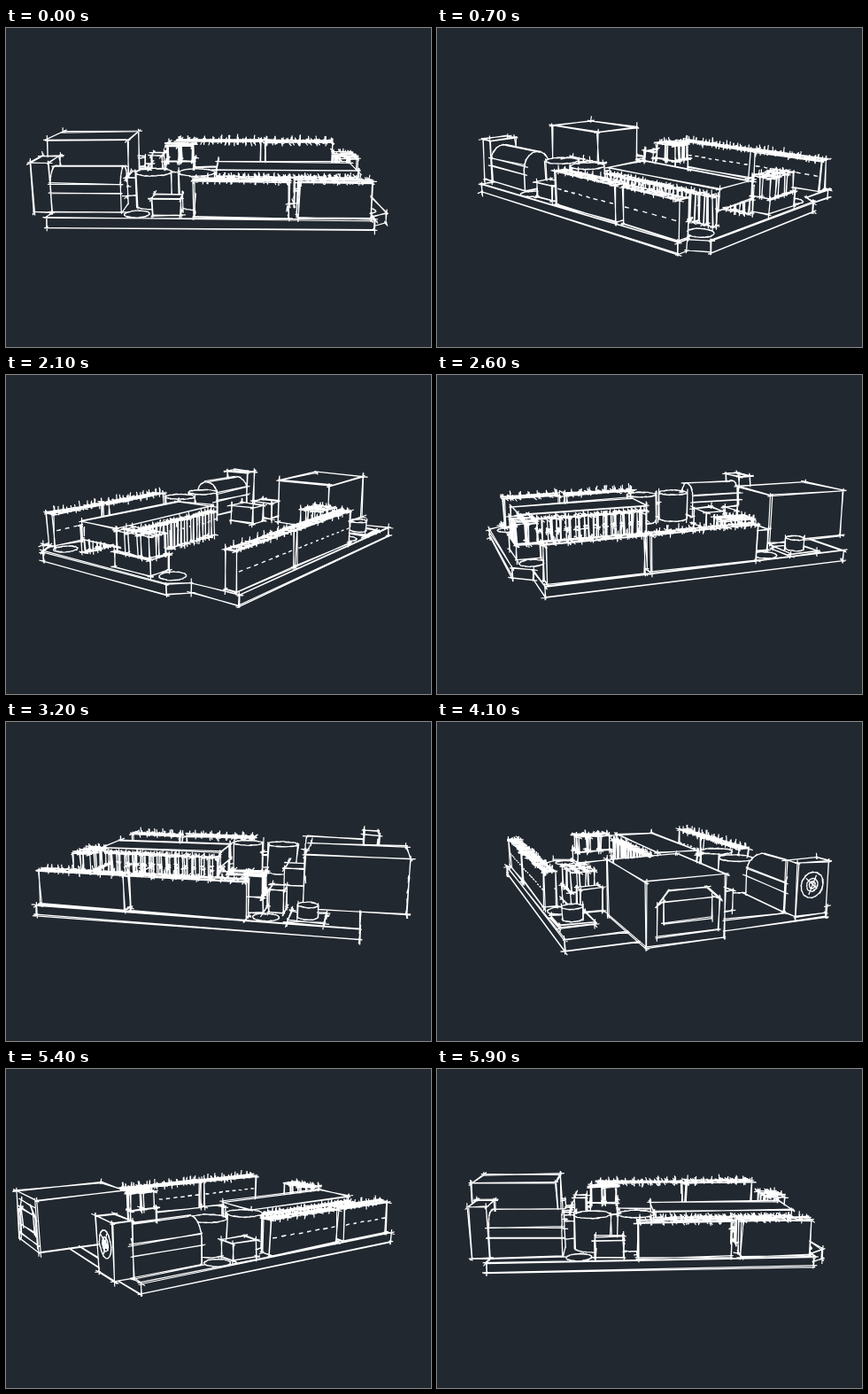
Recreate the animation shown at these times as an HTML page with a canvas. Size 480 by 360 pixels, loop 6000 ms.

```html
<!DOCTYPE html>
<html lang="en">
<head>
<meta charset="utf-8">
<title>Rotating circuit board sketch</title>
<style>
html, body { margin: 0; width: 100%; height: 100%; overflow: hidden; background: #212830; }
canvas { display: block; }
</style>
</head>
<body>
<canvas id="stage" width="480" height="360"></canvas>
<script>
const W = 480, H = 360, STEP = 100, STEPS = 60;
const ctx = document.getElementById('stage').getContext('2d');
const depth = new Float32Array(W * H);
const faces = [], edges = [];

// ---- model, in millimetres around the pivot ----
function line(a, b, soft = false, extra = {}) {
  edges.push({ a, b, soft, ...extra });
}

function loop(ring, soft) {
  ring.forEach((p, i) => line(p, ring[(i + 1) % ring.length], soft));
}

function solid(lo, hi, round = false) {
  const n = lo.length;
  const quads = lo.map((p, i) => [p, lo[(i + 1) % n], hi[(i + 1) % n], hi[i]]);
  faces.push(lo, hi, ...quads);
  loop(lo, round);
  loop(hi, round);
  lo.forEach((p, i) =>
    line(p, hi[i], false, round ? { sides: [quads[(i + n - 1) % n], quads[i]] } : {}));
}

const at = (ring, z) => ring.map(([x, y]) => [x, y, z]);
const rect = (x0, x1, y0, y1) => [[x0, y0], [x1, y0], [x1, y1], [x0, y1]];
const prism = (ring, z0, z1, round) => solid(at(ring, z0), at(ring, z1), round);
const box = (x0, x1, y0, y1, z0, z1) => prism(rect(x0, x1, y0, y1), z0, z1);

function circle(x, y, r, n = 20) {
  return Array.from({ length: n }, (_, i) => {
    const a = i / n * 2 * Math.PI;
    return [x + r * Math.cos(a), y + r * Math.sin(a)];
  });
}

function header(x0, x1, y0, y1, pins) {
  const top = 7.4, pitch = (x1 - x0) / pins, mid = (y0 + y1) / 2;
  box(x0, x1, y0, y1, 0, top);
  for (let i = 0; i < pins; i++) {
    const x = x0 + pitch * (i + .5);
    loop(at(rect(x - .75, x + .75, mid - .75, mid + .75), top));
    for (const y of [mid - .75, mid + .75])
      line([x - .75, y, top], [x - .75, y, top + .5]);
    for (const y of [y0, y1])
      line([x - .5, y, 3.6], [x + .5, y, 3.6], true, { oblique: true });
  }
}

function pinBlock(x0, x1, y0, y1) {
  box(x0, x1, y0, y1, 0, 3.2);
  const px = (x1 - x0) / 2, py = (y1 - y0) / 3;
  for (let i = 0; i < 2; i++)
    for (let j = 0; j < 3; j++) {
      const x = x0 + px * i, y = y0 + py * j;
      box(x + .35, x + px - .35, y + py * .15, y + py * .85, 3.2, 7.4);
    }
}

function buildBoard() {
  prism([[-34, -26], [32, -26], [32, -23.5], [35.5, -21], [35.5, 15.6],
    [32, 18.6], [32, 29.5], [-34, 29.5]], -2.1, 0);
  for (const [x, y] of [[31.2, -18.8], [31.2, 13.4], [-16, -23.3], [-16, 26]])
    loop(at(circle(x, y, 2.6), 0), true);
}

function buildUsb() {
  const x = -42.8, y0 = 3.2, y1 = 17.9, top = 11.2;
  box(x, -22.5, y0, y1, 0, top);
  const onFace = ([u, v]) => [x, y1 + (y0 - y1) * u, top * v];
  loop([[.13, .14], [.13, .62], [.27, .84], [.75, .84], [.92, .64], [.92, .14]].map(onFace));
  loop([[.22, .34], [.22, .68], [.83, .68], [.83, .34]].map(onFace));
  line(onFace([.13, .62]), onFace([.22, .68]));
  line(onFace([.92, .64]), onFace([.83, .68]));
}

function buildJack() {
  const y = -19.15, r = 3.65, z = 5.5, front = -37.5, joint = -33.8, back = -19.3;
  box(front, joint, y - r, y + r, 0, 10.6);
  const arch = [[y + r, 0]];
  for (let i = 0; i <= 10; i++) {
    const a = i / 10 * Math.PI;
    arch.push([y + r * Math.cos(a), z + r * Math.sin(a)]);
  }
  arch.push([y - r, 0]);
  const slice = x => arch.map(([u, v]) => [x, u, v]);
  solid(slice(joint), slice(back), true);
  for (const side of [y - r, y + r])
    for (const h of [4.1, 6.2]) line([joint, side, h], [back, side, h]);
  for (const rr of [2.6, 1.3, .7])
    loop(circle(y, 6.1, rr, 16).map(([u, v]) => [front, u, v]), true);
  line([front, y - .8, 7.8], [front, y + .5, 4.6]);
  line([front, y + .9, 7], [front, y - .9, 5.6]);
}

function buildChip() {
  box(0, 31, -13, -2.1, 3.2, 7.1);
  for (let i = 0; i < 14; i++) {
    const x = .5 + i * 2.21;
    box(x, x + 1.2, -14.2, -13, 0, 5.8);
    box(x, x + 1.2, -2.1, -.9, 0, 5.8);
  }
}

buildBoard();
buildUsb();
buildJack();
buildChip();
header(-4.1, 14.9, -25, -22.4, 8);
header(17, 31.3, -25, -22.4, 6);
header(-12.5, 11.2, 26, 28.5, 10);
header(12.5, 31.4, 26, 28.5, 8);
pinBlock(28.8, 33.8, .3, 10.2);
pinBlock(-15, -7.5, 18, 23.5);
prism(circle(-13.4, -16, 3.9), 0, 7.3, true);
prism(circle(-4.1, -16, 3.9), 0, 7.3, true);
box(-12.7, -6.9, -24, -20, 0, 3.5);
box(-19, -16, 18, 22.5, 0, 4.7);
box(-29, -24.5, -6.4, -.5, 0, 4.2);
box(-21, -16, -8, -1, 0, 4.2);
box(-27.4, -20.6, 22.1, 28.9, 0, .5);
prism(circle(-24, 25.5, 2, 14), .5, 2.9, true);

// ---- camera ----
let cos = 1, sin = 0;

function project([x, y, z]) {
  const s = cos * y - sin * x, t = cos * x + sin * y;
  const w = 1 / (145 - t - .242 * z);
  return { x: 240 + 670 * s * w, y: 180.8 + (157 * t - 651 * z) * w, w };
}

function turn(quad) {
  const [a, b, c, d] = quad.map(project);
  return (c.x - a.x) * (d.y - b.y) - (d.x - b.x) * (c.y - a.y) > 0;
}

// ---- depth buffer ----
function fillTriangle(a, b, c) {
  const area = (b.x - a.x) * (c.y - a.y) - (c.x - a.x) * (b.y - a.y);
  if (Math.abs(area) < .01) return;
  const x0 = Math.max(0, Math.ceil(Math.min(a.x, b.x, c.x)));
  const x1 = Math.min(W - 1, Math.floor(Math.max(a.x, b.x, c.x)));
  const y0 = Math.max(0, Math.ceil(Math.min(a.y, b.y, c.y)));
  const y1 = Math.min(H - 1, Math.floor(Math.max(a.y, b.y, c.y)));
  for (let y = y0; y <= y1; y++)
    for (let x = x0; x <= x1; x++) {
      const u = ((x - a.x) * (c.y - a.y) - (c.x - a.x) * (y - a.y)) / area;
      const v = ((b.x - a.x) * (y - a.y) - (x - a.x) * (b.y - a.y)) / area;
      if (u < 0 || v < 0 || u + v > 1) continue;
      const w = a.w + u * (b.w - a.w) + v * (c.w - a.w), i = y * W + x;
      if (w > depth[i]) depth[i] = w;
    }
}

function fillFace(face) {
  const p = face.map(project);
  const mean = k => p.reduce((sum, q) => sum + q[k], 0) / p.length;
  const mid = { x: mean('x'), y: mean('y'), w: mean('w') };
  p.forEach((q, i) => fillTriangle(mid, q, p[(i + 1) % p.length]));
}

function visible(x, y, w) {
  const px = Math.round(x), py = Math.round(y);
  if (px < 1 || py < 1 || px > W - 2 || py > H - 2) return false;
  const i = py * W + px;
  return w * 1.006 >= Math.min(depth[i], depth[i - 1], depth[i + 1], depth[i - W], depth[i + W]);
}

// ---- sketched strokes ----
function randomFrom(seed) {
  return () => {
    seed = seed + 0x6D2B79F5 | 0;
    let t = Math.imul(seed ^ seed >>> 15, 1 | seed);
    t = t + Math.imul(t ^ t >>> 7, 61 | t) ^ t;
    return ((t ^ t >>> 14) >>> 0) / 4294967296;
  };
}

function strokeEdge({ a, b, soft, sides, oblique }, rnd) {
  if (oblique && Math.abs(cos) < .5) return;
  if (sides && turn(sides[0]) === turn(sides[1])) return;
  const p = project(a), q = project(b);
  const dx = q.x - p.x, dy = q.y - p.y, len = Math.hypot(dx, dy);
  if (len < .5) return;
  const n = Math.ceil(len), reach = soft ? .4 : 5;
  const wobble = soft ? 1 : len < 30 ? 1.8 : 2.6;
  const jitter = () => (rnd() - .5) * wobble;

  const run = (i, j) => {
    if (j - i < 1) return;
    for (let k = 0; k < 2; k++) {
      const from = i / n - (i === 0 ? rnd() * reach / len : 0);
      const to = j / n + (j === n ? rnd() * reach / len : 0);
      ctx.moveTo(p.x + dx * from + jitter(), p.y + dy * from + jitter());
      ctx.lineTo(p.x + dx * to + jitter(), p.y + dy * to + jitter());
    }
  };

  let start = -1;
  for (let i = 0; i <= n; i++) {
    const f = i / n;
    const seen = visible(p.x + dx * f, p.y + dy * f, p.w + (q.w - p.w) * f);
    if (seen && start < 0) start = i;
    if (!seen && start >= 0) {
      run(start, i - 1);
      start = -1;
    }
  }
  if (start >= 0) run(start, n);
}

function draw(step) {
  const angle = (step * 360 / STEPS - 88) * Math.PI / 180;
  cos = Math.cos(angle);
  sin = Math.sin(angle);
  depth.fill(0);
  faces.forEach(fillFace);
  ctx.fillStyle = '#212830';
  ctx.fillRect(0, 0, W, H);
  ctx.strokeStyle = '#fff';
  ctx.lineWidth = 1.2;
  ctx.beginPath();
  const rnd = randomFrom(step * 7919 + 1);
  edges.forEach(e => strokeEdge(e, rnd));
  ctx.stroke();
}

const begin = performance.now();
let shown = -1;

function tick() {
  const step = Math.floor((performance.now() - begin) / STEP) % STEPS;
  if (step !== shown) draw(shown = step);
  requestAnimationFrame(tick);
}
tick();
</script>
</body>
</html>
```
